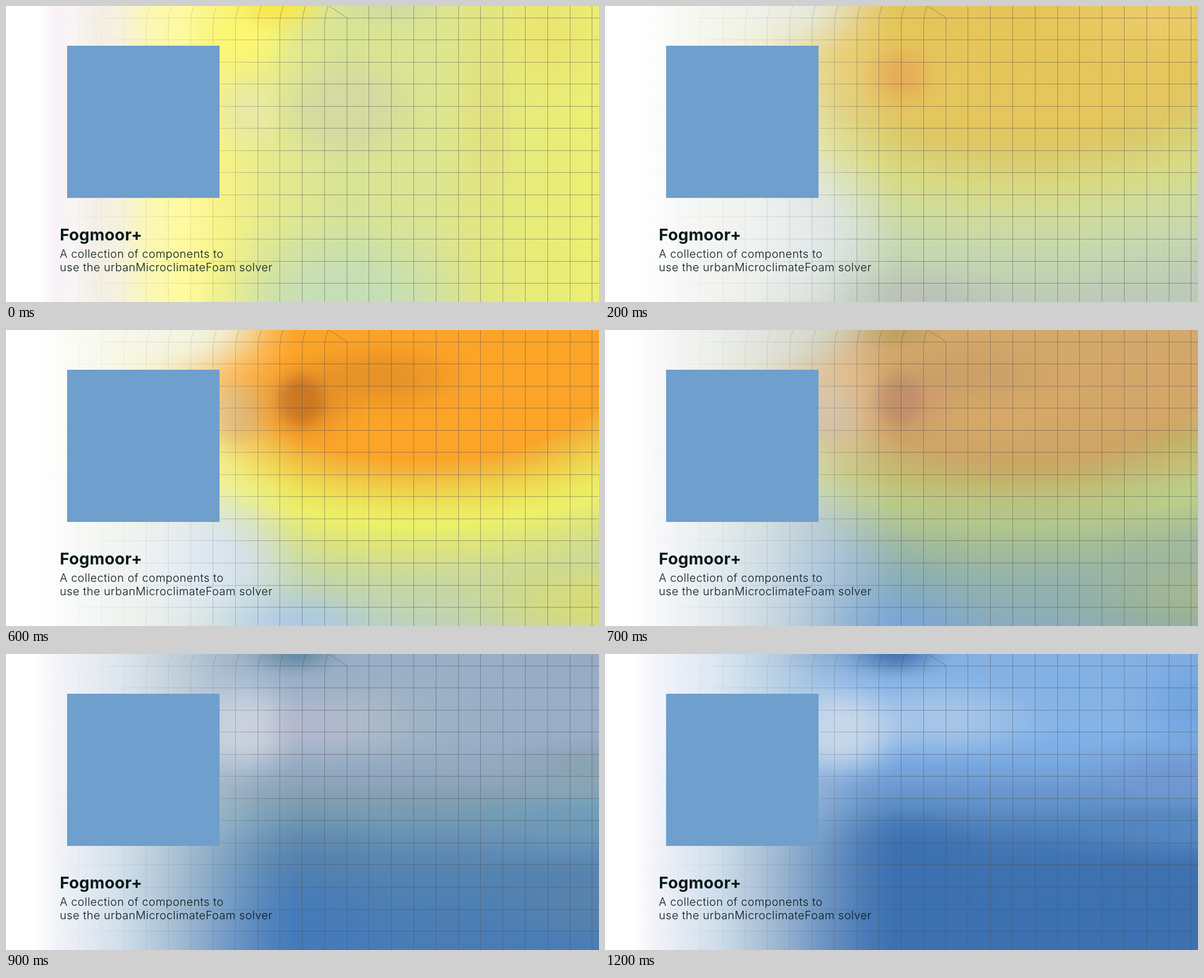
Recreate the animation shown at these times as an HTML page. Size 1058 px wide and 529 px high, loop 1.3 s.

```html
<!DOCTYPE html>
<html lang="en">
<head>
<meta charset="utf-8">
<title>Fogmoor+</title>
<style>
  html, body { margin: 0; width: 100%; height: 100%; overflow: hidden; background: #fff; }
  #stage { position: relative; width: 1058px; height: 529px; overflow: hidden; }
  .field, svg { position: absolute; left: 0; top: 0; width: 1058px; height: 529px; }
  .field { opacity: 0; }
  text { font-family: Inter, "Open Sans", sans-serif; fill: #071a1c; }
  .title { font-size: 29px; font-weight: 700; letter-spacing: .3px; }
  .note { font-size: 20px; font-weight: 350; letter-spacing: .52px; }
</style>
</head>
<body>
<div id="stage">
  <svg viewBox="0 0 1058 529">
    <defs>
      <linearGradient id="fade" gradientUnits="userSpaceOnUse" x1="60" y1="0" x2="520" y2="0">
        <stop offset="0" stop-color="#fff" stop-opacity="0"/>
        <stop offset=".35" stop-color="#fff" stop-opacity=".17"/>
        <stop offset=".65" stop-color="#fff" stop-opacity=".42"/>
        <stop offset="1" stop-color="#fff"/>
      </linearGradient>
      <mask id="left" maskUnits="userSpaceOnUse" x="0" y="0" width="1058" height="529">
        <rect width="1058" height="529" fill="url(#fade)"/>
      </mask>
    </defs>
    <g mask="url(#left)"><path id="grid" fill="none" stroke="#555055" stroke-opacity=".5"/></g>
    <rect x="109" y="71" width="272" height="272" fill="#6f9fcc"/>
    <text class="title" x="96" y="419">Fogmoor+</text>
    <text class="note" x="96" y="450">A collection of components to</text>
    <text class="note" x="96" y="473.5">use the urbanMicroclimateFoam solver</text>
  </svg>
</div>
<script>
const stage = document.getElementById('stage');
const overlay = stage.querySelector('svg');
const STEP = 100, STEPS = 13;

// "x y rx ry core colour" becomes a soft ellipse
function blob(spec) {
  const [x, y, rx, ry, core, colour] = spec.split(' ');
  const stops = ['ff', 'd8', '80', '28', '00'].map((a, i) =>
    `${colour}${a} ${100 * (+core + (1 - core) * i / 4)}%`);
  return `radial-gradient(${rx}px ${ry}px at ${x}px ${y}px, ${stops})`;
}

// "position colour, position colour, ..."
const stopList = (spec, scale = 1) => spec.split(', ').map(s => {
  const [p, c] = s.split(' ');
  return `${c} ${p * scale}px`;
});
const ramp = (dir, spec) => `linear-gradient(${dir}, ${stopList(spec)})`;

// Bands around the heat plume; positions are measured straight down from its middle.
const bowl = spec => `radial-gradient(900px 500px at 740px 30px, ${stopList(spec, 1.8)})`;

const warmFade = ramp('to right',
  '62 #ffffff, 80 #fffffff6, 160 #f9faf9ea, 250 #f9f9f5c0, 340 #fafaf470, 420 #fcfcf830, 520 #ffffff00');
const coolFade = ramp('to right',
  '50 #ffffff, 75 #fafafcfa, 110 #f5f5fbf2, 200 #eaf1f5d8, 300 #dce5e7a0, 390 #cfdde655, 460 #c8dcec1c, 515 #c8dcec00');

const scenes = [
  [
    blob('485 -5 110 65 0 #fbe648'),
    blob('425 50 120 110 0 #fdf870'),
    blob('610 185 150 115 .3 #d4daa0'),
    blob('690 0 110 50 .1 #d0dca0'),
    blob('435 190 85 90 .1 #e8e9a4'),
    blob('605 545 270 200 .2 #c4deb6'),
    blob('860 190 60 240 0 #e2e07c'),
    blob('970 60 110 130 0 #ebe470'),
    ramp('to right', '62 #ffffff, 85 #f9f2f8, 120 #f8f5f4, 160 #f4eee6, 205 #f5f2dc, 255 #fbf7b4, 320 #fefa9e, ' +
      '390 #f5f288, 480 #e3e98e, 600 #d8e494, 750 #dbe592, 850 #e2e682, 950 #e8ec78, 1058 #ebef72')
  ],
  [
    warmFade,
    blob('525 125 85 75 0 #e6aa58'),
    blob('980 20 220 90 0 #ebcb68'),
    blob('310 -20 210 130 .25 #dcdfce'),
    blob('560 540 200 85 .1 #bac2b6'),
    blob('320 410 220 190 .2 #d8e0e4'),
    bowl('0 #e6c558, 185 #e4c65c, 225 #dec866, 255 #d9d074, 295 #d8da82, 345 #d0dc9a, 410 #c6d8ae, 500 #bccab8')
  ],
  [
    warmFade,
    blob('525 130 115 100 .2 #fda22a'),
    blob('690 70 200 75 0 #f6b034'),
    blob('410 148 85 60 .1 #dcb064'),
    blob('1010 130 190 75 0 #deb04e'),
    blob('310 -20 210 130 .25 #e4e6d2'),
    blob('515 550 180 120 0 #a8c6ec'),
    blob('330 420 240 180 .2 #ccdcee'),
    blob('1058 490 300 130 0 #ccd89a'),
    bowl('0 #f0b838, 185 #f0b93c, 225 #e8c24e, 255 #dfce66, 282 #e0de6e, 308 #e3e87a, 360 #d8e08c, 420 #c8d8a8, 500 #bcd2c2')
  ],
  [
    warmFade,
    blob('526 126 56 60 .35 #cc7822'),
    blob('530 128 120 90 0 #dc8824'),
    blob('665 85 190 80 .1 #e69226'),
    blob('410 148 75 80 .2 #dcaa58'),
    blob('310 -20 210 130 .25 #eceecc'),
    blob('515 550 210 120 0 #aac8ec'),
    blob('330 420 240 180 .2 #ccdcee'),
    blob('1058 490 330 130 0 #d8dc76'),
    bowl('0 #fca428, 203 #fca428, 225 #f2b63a, 256 #f0d04a, 288 #ece65c, 318 #ecf068, 362 #dce47e, 415 #c8d8a0, 500 #bcd2bc')
  ],
  [
    coolFade,
    blob('550 130 95 65 .2 #b8a8b4'),
    blob('430 125 100 115 .2 #c8c4ca'),
    blob('515 0 100 50 0 #859e98'),
    blob('710 110 170 100 .2 #b4b0a8'),
    blob('1050 205 180 55 0 #93a892'),
    blob('1050 285 300 60 0 #88aeae'),
    blob('530 530 190 190 .1 #4c84c4'),
    blob('1058 440 240 100 0 #7494a8'),
    ramp('to bottom', '0 #acacac, 150 #acaaaa, 225 #a1a5a1, 262 #98a492, 300 #8aa8a6, 340 #7c9eae, 380 #6c96b0, 430 #6290b6, 529 #5686be')
  ],
  [
    coolFade,
    blob('515 -5 110 50 0 #4474ae'),
    blob('425 135 130 100 .2 #c6d6ea'),
    blob('580 125 200 90 .1 #abc9e8'),
    blob('390 -20 170 80 0 #7098c8'),
    blob('1058 200 250 70 0 #7c9ed2'),
    blob('1010 10 160 90 0 #80acdc'),
    blob('540 410 200 150 .2 #3c70b0'),
    blob('1058 320 340 70 0 #5488c4'),
    ramp('to bottom', '0 #88b2e2, 150 #86b4e4, 205 #80acdf, 240 #78a0d4, 270 #6496cc, 310 #5488c0, 355 #4679b6, 400 #3e72b1, 529 #3c70b0')
  ],
  [
    coolFade,
    blob('515 -5 115 55 0 #4272ae'),
    blob('425 135 130 100 .2 #c4d5ea'),
    blob('600 115 220 85 .1 #a6c5e8'),
    blob('390 -20 170 80 0 #6c96c8'),
    blob('1058 215 260 75 0 #7098d2'),
    blob('1058 90 150 130 0 #70a4e0'),
    blob('540 400 200 155 .2 #3c70b0'),
    blob('1058 315 320 60 0 #5488c4'),
    ramp('to bottom', '0 #84b0e2, 130 #84b4e8, 190 #7aaae2, 240 #6c98d0, 270 #6090c8, 305 #5084be, 345 #4477b5, 385 #3d71b0, 529 #3c70b0')
  ]
];

// Each scene enters at half strength, then holds for two steps.
scenes.forEach((layers, i) => {
  const el = document.createElement('div');
  el.className = 'field';
  el.style.background = layers.join(',');
  stage.insertBefore(el, overlay);
  const frames = [];
  for (let k = 0; k <= STEPS; k++) {
    const d = k - 2 * i;
    const opacity = d === -1 ? .5 : d === 0 || d === 1 ? 1 : 0;
    frames.push({ offset: k / STEPS, opacity, easing: 'steps(1, end)' });
  }
  el.animate(frames, { duration: STEP * STEPS, iterations: Infinity });
});

const snap = v => Math.floor(v) + .5;
let d = 'M608.5 21L576 0';
for (let k = -13; k <= 11; k++) {
  const x = snap(608.2 + 39.78 * k);
  d += k < 0 ? `M${x} 529V30Q${x} 14 ${x + 6} 0` : `M${x} 529V${k ? 0 : 21}`;
}
for (let k = 0; k < 13; k++) d += `M50 ${snap(21 + 39.55 * k)}H1058`;
document.getElementById('grid').setAttribute('d', d);
</script>
</body>
</html>
```
